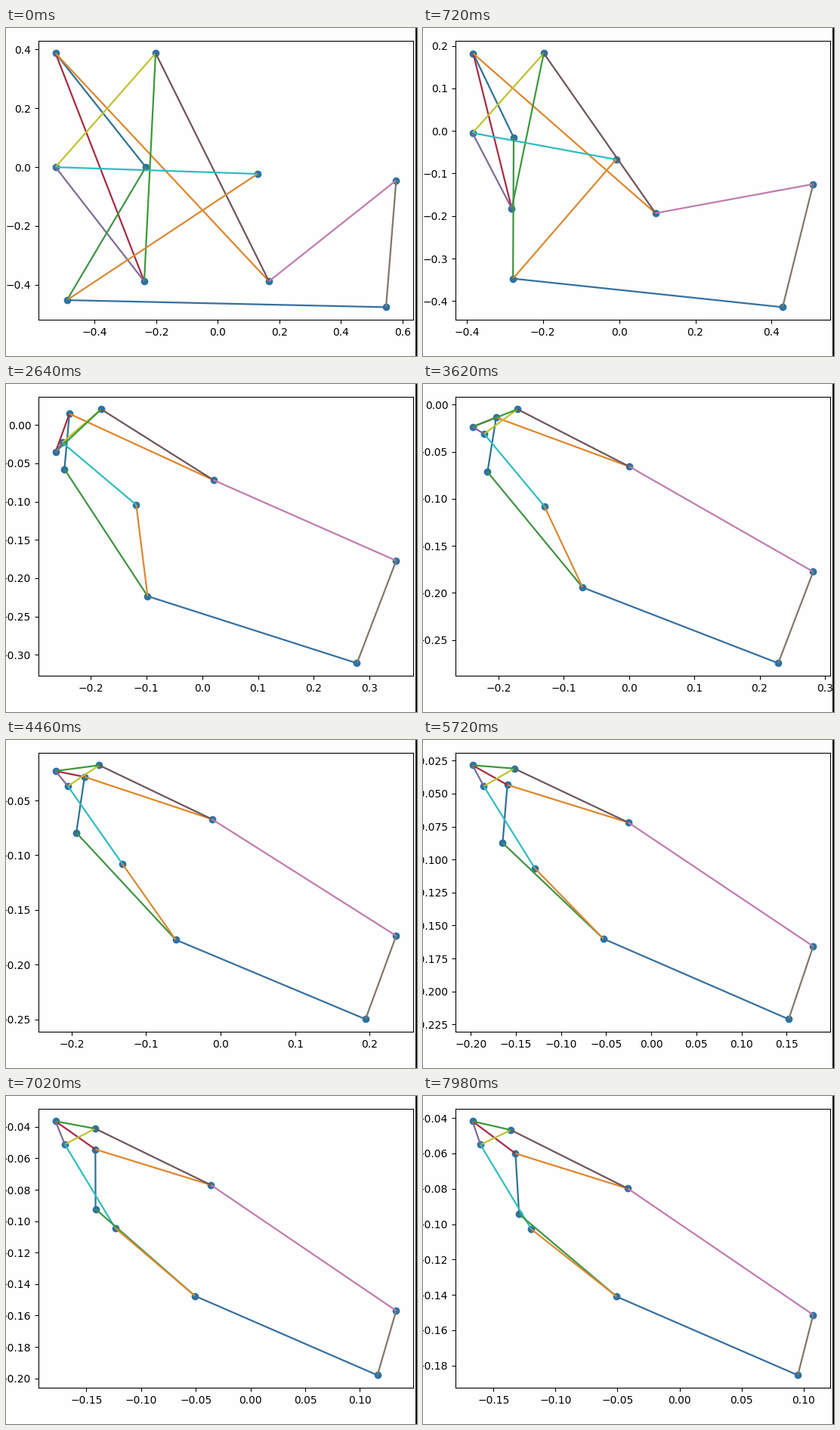
A matplotlib script for the animation above (8000 ms loop, 544 by 434 pixels).

```python
import numpy as np
import matplotlib.pyplot as plt
from matplotlib.animation import FuncAnimation
from matplotlib.collections import LineCollection
from matplotlib.lines import Line2D

W, H, DPI = 544, 434, 100
TICK = 20            # ms
FRAMES = 400         # 8000 ms
PAPER = "#fefefe"

# Starting places of the ten nodes
START = np.array([
    (-0.527, 0.387), (-0.202, 0.387), (-0.527, 0), (-0.234, 0),
    (0.129, -0.023), (-0.239, -0.388), (-0.490, -0.452),
    (0.166, -0.388), (0.579, -0.045), (0.546, -0.476),
])

# Links between nodes and their colours
LINKS = {
    (0, 3): "#2e7294", (0, 5): "#a62b42", (0, 7): "#de862c",
    (1, 2): "#bfc232", (1, 5): "#3c993a", (1, 7): "#6f5658",
    (2, 4): "#30bcc0", (2, 5): "#7c6c98", (3, 6): "#3f9444",
    (4, 6): "#d88a34", (6, 9): "#3570a0", (7, 8): "#c07cb0",
    (8, 9): "#80796a",
}
PAIRS = np.array(list(LINKS))

DRIFT = np.array([0.0066, 0.0040])   # slow shift of the common centre
SETTLE = 40                          # steps


def laplacian():
    lap = np.zeros((len(START),) * 2)
    for i, j in LINKS:
        lap[i, j] = lap[j, i] = -1
    return lap - np.diag(lap.sum(axis=1))


DECAY, MODES = np.linalg.eigh(laplacian())


def nodes_at(step):
    """Consensus flow: every node is pulled towards its neighbours."""
    t = 0.0095 * step - 6.65e-6 * step ** 2
    flow = MODES @ (np.exp(-DECAY * t)[:, None] * (MODES.T @ START))
    return flow + DRIFT * (1 - np.exp(-step / SETTLE))


def step_at(frame):
    """Steps last 20, 20 and 100 ms in turn; the loop enters at the second."""
    group, rest = divmod(frame + 1, 7)
    return 3 * group + min(rest, 2) - 1


def padded(values):
    lo, hi = values.min(), values.max()
    pad = 0.05 * (hi - lo)
    return lo - pad, hi + pad


fig = plt.figure(figsize=(W / DPI, H / DPI), dpi=DPI, facecolor=PAPER)
ax = fig.add_axes([43 / W, 47.8 / H, 496 / W, 369.6 / H], facecolor=PAPER)
fig.add_artist(Line2D([(W - 1) / W] * 2, [0, 1], color="black",
                      lw=2 * 72 / DPI))

dots = ax.scatter(*START.T, color="#2c72a2", zorder=1)
edges = LineCollection(START[PAIRS], colors=list(LINKS.values()),
                       linewidths=1.6, zorder=2)
ax.add_collection(edges)


def update(frame):
    nodes = nodes_at(step_at(frame))
    dots.set_offsets(nodes)
    edges.set_segments(nodes[PAIRS])
    ax.set_xlim(padded(nodes[:, 0]))
    ax.set_ylim(padded(nodes[:, 1]))
    return dots, edges


anim = FuncAnimation(fig, update, frames=FRAMES, interval=TICK,
                     init_func=lambda: update(0), repeat=True,
                     repeat_delay=0, blit=False)
plt.show()
```
